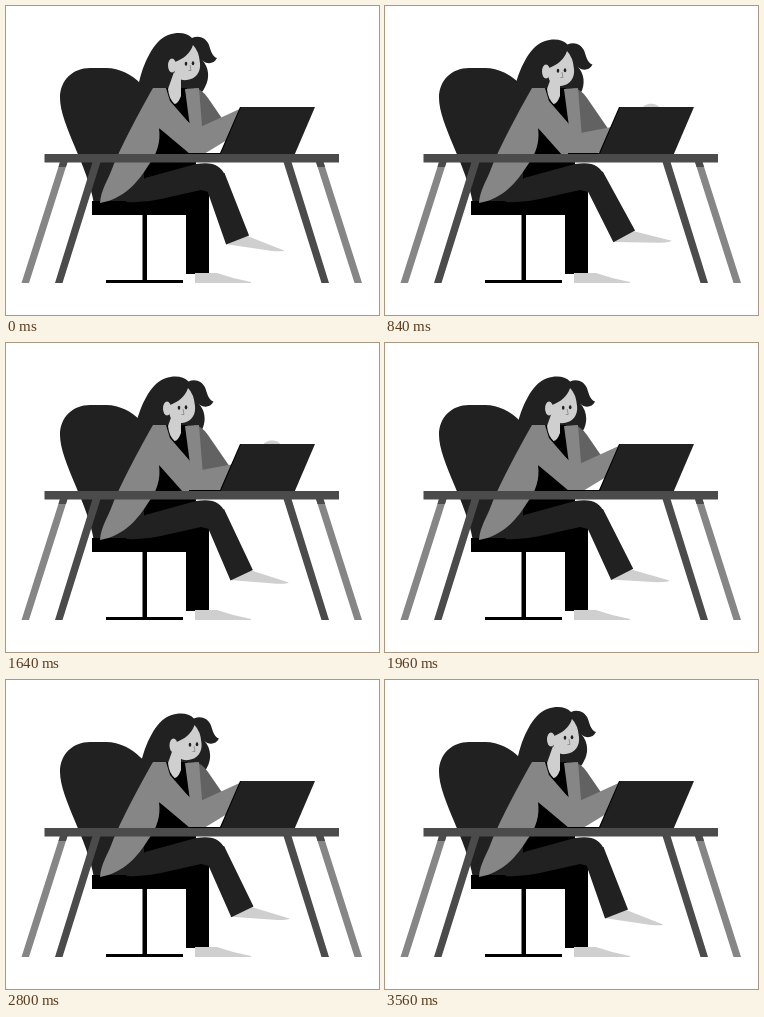
Animation of 373 by 309 pixels, one loop 3600 ms. Source, as an HTML page:

```html
<!DOCTYPE html>
<html lang="en">
<head>
<meta charset="utf-8">
<title>Working at a desk</title>
<style>
html, body { margin: 0; width: 100%; height: 100%; overflow: hidden; background: #fff; }
svg { display: block; width: 373px; height: 309px; }
.ink { fill: #212121; }
.cloth { fill: #868686; }
.skin { fill: #cfcfcf; }
.desk { fill: #4b4b4b; }
</style>
</head>
<body>
<svg viewBox="0 0 373 309">
  <!-- chair -->
  <path class="ink" d="M88 198C82 160 54 118 54 92C54 74 67 62 84 62H100C114 62 126 69 134 77L150 90V198Z"/>
  <path d="M86 195H182V209H141V274H177V277H100V274H136.5V209H86Z"/>

  <!-- hair -->
  <g id="hair">
    <path class="ink" d="M131 92C132 70 142 45 154 34C163 26 179 24 186 32C192 29 200 31 203 39C205 46 207 51 211 52C208 58 201 59 196 54C203 61 204 72 199 81Q196 88 190 91L150 96Z"/>
  </g>

  <!-- far arm and torso -->
  <path id="hand" class="skin" d="M256 104C258 96 273 95 276 104Z"/>
  <path fill="#626262" d="M188 82Q196 83 202 92L224 124L196 134Z"/>
  <path d="M158 82H181L190 150V162L138 178V140Z"/>
  <path class="cloth" d="M179 83L193 82L197 132L186 136Z"/>
  <path class="cloth" d="M147 82H160L164 95L184 118L180 140L153 122C155 136 151 148 142 160C132 176 118 193 94 197C95 184 101 176 106 163C115 140 135 103 147 82Z"/>
  <path id="forearm" class="cloth"/>
  <path class="skin" d="M168 66L175 72V90Q172 98 168.500 98Q163 93 162 83Z"/>

  <!-- face -->
  <g id="face" class="skin">
    <ellipse cx="166" cy="59.500" rx="4" ry="7"/>
    <path d="M187 39C184 48 177 53 169 56L168 63C169 71 174 75 181 74C190 73 195 66 194 57Q193 45 187 39Z"/>
    <g id="features">
      <ellipse fill="#212121" cx="180" cy="57.800" rx="1.300" ry="2"/>
      <ellipse fill="#212121" cx="187" cy="57.300" rx="1.300" ry="2"/>
      <path d="M184 59L185 64.500H182.500" fill="none" stroke="#8c8c8c" stroke-width=".9"/>
    </g>
  </g>

  <!-- legs -->
  <path d="M122 196L180 176H203V268H180V200Z"/>
  <path class="skin" d="M189 267H211Q228 273 245 276V277H189Z"/>
  <g id="shin">
    <path class="skin" d="M219 238L240 229.500L278 244.500Q277 246 266 245Z"/>
    <path class="ink" d="M195 172L218.500 167L243 229.500L220 238.500L201 184Z"/>
  </g>
  <path class="ink" d="M120 196L139 172L190 158C207 155 215 160 219 169L203 186L195 184L155 193Q138 197 120 196Z"/>

  <!-- laptop and table -->
  <path d="M183 147H214L234 101H238L217 150H183Z"/>
  <path class="ink" d="M235 101H309L288 150H214Z"/>
  <path class="cloth" d="M54 156H61.500L23 277H15.500ZM310 156H317.500L356 277H348.500Z"/>
  <path class="desk" d="M86.500 156H94.500L56.500 277H49ZM277.500 156H285.500L323 277H315.500Z"/>
  <path class="desk" d="M54 156H61.500L60 161H52.500ZM310 156H317.500L319 161H311.500Z"/>
  <path class="desk" d="M38.500 148H333V156.500H38.500Z"/>
</svg>
<script>
const LOOP = 3600, TYPING = 720, SWING = 588;
const part = id => document.getElementById(id);
const [hair, face, features, hand, forearm, shin] =
  ['hair', 'face', 'features', 'hand', 'forearm', 'shin'].map(part);

const ease = (t, from, to) => {
  const x = Math.min(1, Math.max(0, (t - from) / (to - from)));
  return x * x * (3 - 2 * x);
};
const mix = (a, b, k) => a.map((v, i) => v + (b[i] - v) * k);
const shift = (el, x, y) => el.setAttribute('transform', `translate(${x} ${y})`);

// hair x, y, face x, y, features x, y
const UP = [0, 0, 0, 0, 0, 0];
const LEFT = [-3.5, 6.5, -5, 6, -2, 1];
const RIGHT = [2, 6.5, 1.5, 6, 2.5, 1];

// forearm: inner bend, wrist top, wrist bottom, underside, elbow
const RAISED = [190, 123, 238, 101, 226, 131, 198, 148, 184, 148];
const LOWERED = [190, 128, 228, 121, 216, 146, 208, 149, 177, 149];

function moveHead(t) {
  let pose = mix(UP, LEFT, ease(t, 160, 700));
  pose = mix(pose, RIGHT, ease(t, 1720, 2220));
  pose = mix(pose, UP, ease(t, 2820, 3300));
  [hair, face, features].forEach((el, i) => shift(el, pose[2 * i], pose[2 * i + 1]));
}

function moveArms(t) {
  const p = (t % TYPING) / TYPING;
  const k = ease(p, 0.02, 0.18) - ease(p, 0.48, 0.66);
  const outline = mix(RAISED, LOWERED, k).join(' ');
  forearm.setAttribute('d', `M153 122L180 114L${outline}Z`);
  shift(hand, 0, 8 * (1 - k));
}

function moveLeg(t) {
  const k = 0.5 - 0.5 * Math.cos((t - 20) / SWING * 2 * Math.PI);
  shin.setAttribute('transform', `rotate(${-8.2 * k} 207 172)`);
}

const start = performance.now();
function draw(now) {
  const t = Math.max(0, now - start) % LOOP;
  moveHead(t);
  moveArms(t);
  moveLeg(t);
  requestAnimationFrame(draw);
}
draw(start);
</script>
</body>
</html>
```
